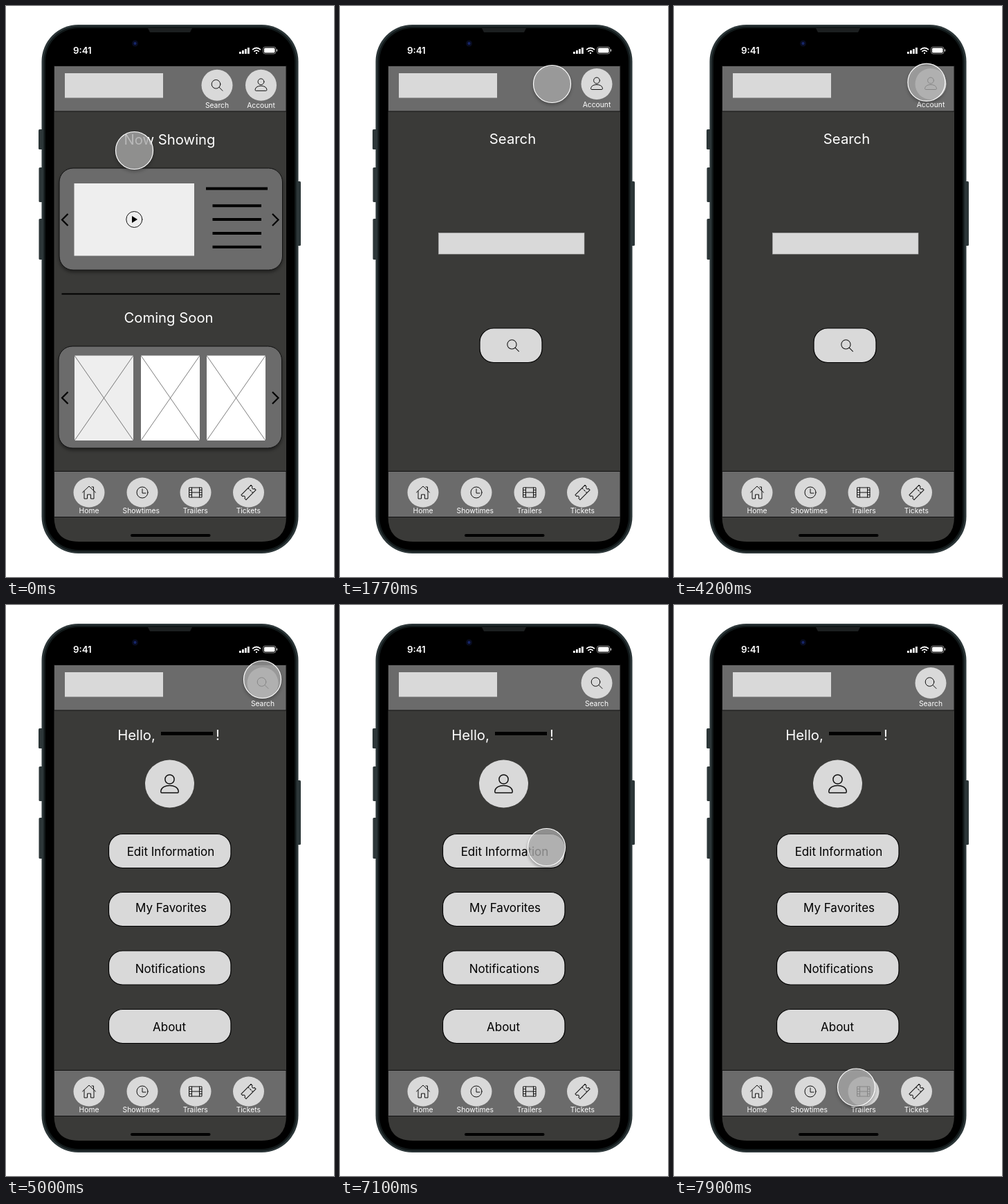
An HTML page for the animation above (7990 ms loop, 474 px wide and 824 px high).

```html
<!DOCTYPE html>
<html lang="en">
<head>
<meta charset="utf-8">
<title>Cinema app wireframe</title>
<style>
html, body { margin: 0; width: 100%; height: 100%; overflow: hidden; background: #fff; }
svg { display: block; width: 474px; height: 824px; }
text { font-family: Inter, "Liberation Sans", sans-serif; font-optical-sizing: none; fill: #fff; text-anchor: middle; }
.label { font-size: 10.3px; }
.title { font-size: 20.3px; }
.action { font-size: 17px; fill: #000; }
.icon { fill: none; stroke: #111; stroke-linejoin: round; stroke-linecap: round; }
.button { fill: #d9d9d9; stroke: #000; stroke-width: 1.2; }
.panel { fill: #6b6b6b; stroke: #111; filter: drop-shadow(0 3px 2px #0006); }
.bar { fill: #6b6b6b; stroke: #111; }
.line { fill: none; stroke: #000; }
#cursor circle { fill: rgba(180, 180, 180, .73); stroke: #fff; stroke-width: 1.2; }
#cursor { filter: drop-shadow(0 3px 2px #0005); }
</style>
</head>
<body>
<svg viewBox="0 0 474 824">
  <defs>
    <g id="search" class="icon"><circle cx="-1.5" cy="-1.5" r="6.3"/><path d="M3 3L8 8"/></g>
    <g id="person" class="icon"><circle cy="-5" r="4.4"/><path d="M-7.6 8Q-8.7 8-8.4 6C-7.5-.7 7.5-.7 8.4 6Q8.7 8 7.6 8Z"/></g>
    <g id="home" class="icon"><path d="M-9.5 0L0-9L9.5 0M-7-2V9H-2.5V3H2.5V9H7V-2M4-8H6.5V-3"/></g>
    <g id="clock" class="icon"><circle r="8"/><path d="M0-5V1H5"/></g>
    <g id="film" class="icon"><path d="M-9-7H9V7H-9ZM-5.5-7V7M5.5-7V7M-5.5 0H5.5M-9-3.5H-5.5M-9 0H-5.5M-9 3.5H-5.5M9-3.5H5.5M9 0H5.5M9 3.5H5.5"/></g>
    <g id="ticket" class="icon"><path transform="rotate(-45)" d="M-10-5H10V-2A2 2 0 0 0 10 2V5H-10V2A2 2 0 0 0-10-2ZM4-5V-3M4-1V1M4 3V5"/></g>
    <path id="chevron" class="line" stroke-width="2.2" d="M4.5-8.5L-4 0L4.5 8.5"/>
  </defs>

  <g fill="#2c3638">
    <rect x="47" y="178" width="8" height="29" rx="1.5"/>
    <rect x="47.5" y="233" width="8" height="50" rx="1.5"/>
    <rect x="47.5" y="307" width="8" height="59" rx="1.5"/>
    <rect x="418" y="253" width="8" height="93" rx="1.5"/>
    <rect x="51.5" y="27" width="371" height="763" rx="53"/>
  </g>
  <rect x="54.5" y="29.5" width="365" height="758" rx="50.5" fill="#12191a"/>
  <rect x="57" y="32" width="360" height="753" rx="48"/>
  <path d="M205 32H269L266 38H208Z" fill="#1c1f20"/>
  <circle cx="186.5" cy="54" r="4.5" fill="#080c20"/>
  <circle cx="186.5" cy="54" r="2" fill="#17266b"/>

  <text x="110.3" y="69.3" font-size="13.3" font-weight="600">9:41</text>
  <g fill="#fff">
    <path d="M337 66h2.8v3h-2.8zM341 64h2.8v5h-2.8zM345 62h2.8v7h-2.8zM349 60h2.8v9h-2.8z"/>
    <rect x="373" y="60.5" width="15.5" height="7" rx="1.5"/>
    <rect x="391" y="62.5" width="1" height="3"/>
  </g>
  <g fill="none" stroke="#fff">
    <rect x="371.5" y="59" width="18.5" height="10" rx="3" stroke-opacity=".5"/>
    <path stroke-width="1.8" d="M356 63.2Q362 57.8 368 63.2M358.3 65.8Q362 62.4 365.7 65.8"/>
    <path stroke-width="2" d="M361 68H363"/>
  </g>

  <path d="M69.5 87H405V737Q405 773 369 773H105.5Q69.5 773 69.5 737Z" fill="#3a3a38"/>
  <rect class="bar" x="69.5" y="86.5" width="335.5" height="65.5"/>
  <rect x="85" y="97" width="142" height="35.5" fill="#d9d9d9"/>
  <rect class="bar" x="69.5" y="671.5" width="335.5" height="66"/>
  <rect x="180" y="762" width="115.5" height="4" rx="2"/>
  <g id="nav"></g>
  <g id="pages"></g>
  <g id="cursor"><circle r="27"/></g>
</svg>
<script>
const $ = id => document.getElementById(id);
const text = (cls, x, y, s) => `<text class="${cls}" x="${x}" y="${y}">${s}</text>`;
const icon = (id, x, y, scale = 1) => `<use href="#${id}" transform="translate(${x} ${y}) scale(${scale})"/>`;
const rect = (x, y, w, h, attrs) => `<rect x="${x}" y="${y}" width="${w}" height="${h}" ${attrs}/>`;
const line = (x1, x2, y, w) => `<path class="line" stroke-width="${w}" d="M${x1} ${y}H${x2}"/>`;
const disc = (x, y, rx, ry) => `<ellipse cx="${x}" cy="${y}" rx="${rx}" ry="${ry}" fill="#d9d9d9"/>`;
const menu = (id, label, x, y) =>
  disc(x, y, 22.5, 22.5) + icon(id, x, y) + text("label", x, y + 33, label);
const panel = (x, y) => rect(x, y, 322.5, 147, 'rx="20" class="panel"') +
  icon("chevron", 85, y + 74.5) + icon("chevron", 389.5, y + 74.5, "-1 1");
const poster = (x, fill) => rect(x, 504.5, 85, 122.5, `fill="${fill}"`) +
  `<path d="M${x} 504.5l85 122.5m0-122.5l-85 122.5" fill="none" stroke="#444" stroke-width=".7"/>`;
const action = (y, label, x, base) =>
  rect(148.5, y, 176.5, 49, 'rx="20" class="button"') + text("action", x, base, label);

$("nav").innerHTML = [
  ["home", "Home", 120, 120], ["clock", "Showtimes", 197, 195.3],
  ["film", "Trailers", 274, 273.7], ["ticket", "Tickets", 350.5, 350.3]
].map(([id, label, x, labelX]) =>
  disc(x, 702, 22.5, 21.5) + icon(id, x, 702) + text("label", labelX, 732, label)).join("");

const homePage = menu("search", "Search", 305, 114.3) + menu("person", "Account", 368.5, 114.3) +
  text("title", 236.5, 199.5, "Now Showing") +
  panel(77, 234) + rect(98.5, 256, 173.5, 104.5, 'fill="#eee"') +
  '<circle class="icon" cx="185.3" cy="308" r="11.5"/><path d="M182 303L190 308L182 313Z"/>' +
  line(289, 378, 263.5, 4) +
  [288.3, 308, 328, 347.7].map(y => line(298.5, 369, y, 4)).join("") +
  line(80.5, 396, 415.5, 1.8) +
  text("title", 235, 457, "Coming Soon") +
  panel(76, 491) + poster(99, "#eee") + poster(195, "#fff") + poster(290, "#fff");

const searchPage = menu("person", "Account", 371, 112.5) +
  text("title", 249.5, 198.5, "Search") +
  rect(142.5, 327.5, 210.5, 30.5, 'fill="#d9d9d9" stroke="#aaa" stroke-width=".6"') +
  rect(202, 465, 90, 49.5, 'rx="20" class="button"') + icon("search", 250, 490, 1.05);

const accountPage = menu("search", "Search", 371, 112.5) +
  text("title", 188.5, 194.5, "Hello,") + line(224, 299, 185.5, 5) + text("title", 306, 194.5, "!") +
  disc(236.5, 258, 35.5, 34.5) + icon("person", 236.5, 259, 1.5) +
  action(330.5, "Edit Information", 238, 362) + action(414.5, "My Favorites", 238.5, 442.5) +
  action(499, "Notifications", 237.5, 530.5) + action(583.5, "About", 236, 615);

$("pages").innerHTML = [homePage, searchPage, accountPage].map(p => `<g>${p}</g>`).join("");
const pageNodes = [...$("pages").children];

const LOOP = 7990;
const smooth = u => u * u * (3 - 2 * u);
const mix = (a, b, u) => a.map((v, i) => v + (b[i] - v) * u);
// The pointer advances in discrete steps of about 88 ms.
const steps = (t, start, gap, n) => Math.max(0, Math.min(n, Math.floor((t - start) / gap) + 1));

const atRest = [185.5, 208.5], onSearch = [305.5, 112.5], settled = [306.5, 112.5],
  onAccount = [370.5, 110], lifted = [370.5, 107.5], onEdit = [298.5, 349.5], onTrailers = [263.5, 696];

function pointer(t) {
  if (t < 1170) {
    const u = steps(t, 100, 88.75, 10) / 10;
    return mix(atRest, onSearch, .6 * smooth(u) + .4 * u);
  }
  if (t < 1770) return [306, 112.5];
  if (t < 4370) return mix(settled, onAccount, smooth(steps(t, 3510, 86, 11) / 11));
  if (t < 5000) return [370.5, t < 4640 ? 110 : t < 4820 ? 109 : 108];
  const k = steps(t, 6390, 87.7, 18);
  if (k <= 9) return mix(lifted, onEdit, (k / 9) ** 2);
  return mix(onEdit, onTrailers, 1 - (1 - (k - 9) / 9) ** 1.5);
}

function draw(now) {
  const t = now % LOOP;
  const current = t < 1770 ? 0 : t < 5000 ? 1 : 2;
  pageNodes.forEach((p, i) => p.style.display = i === current ? "" : "none");
  $("cursor").setAttribute("transform", `translate(${pointer(t)})`);
}

let begin;
function tick(now) {
  begin ??= now;
  draw(now - begin);
  requestAnimationFrame(tick);
}
draw(0);
requestAnimationFrame(tick);
</script>
</body>
</html>
```
